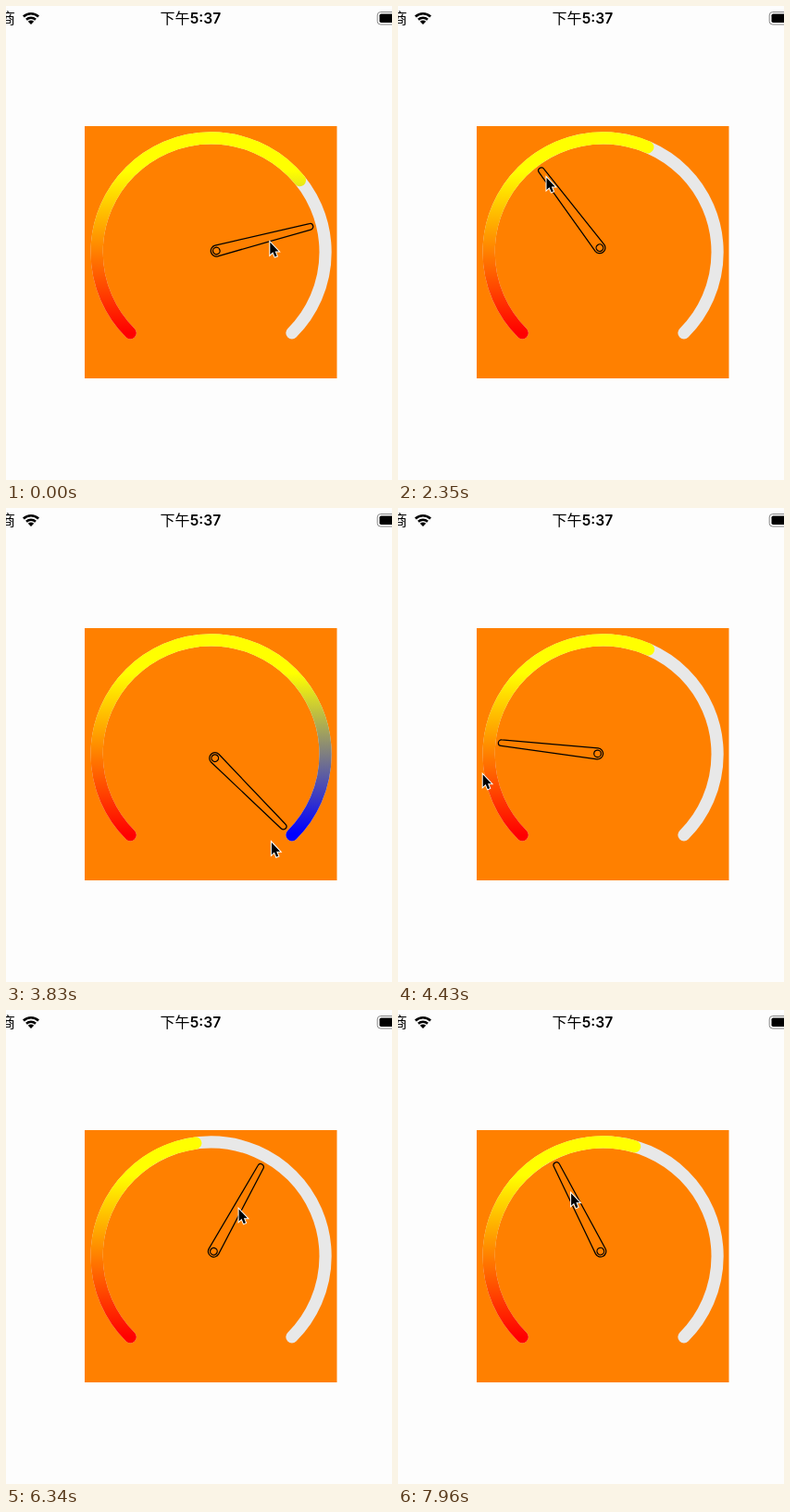
These frames come from a looping animation (417x513 px, 8 s). An HTML page:

```html
<!DOCTYPE html>
<html lang="zh-CN">
<head>
<meta charset="utf-8">
<title>Gauge</title>
<style>
  html, body { margin: 0; width: 100%; height: 100%; overflow: hidden; background: #fdfdfd; }
  svg { display: block; width: 100%; height: 100%; }
  text { font: 500 16px "Noto Sans CJK SC", "Noto Sans CJK", sans-serif; fill: #000; }
  .clock { font: 600 15.6px Inter, sans-serif; }
  .arc { fill: none; stroke-width: 13.2; stroke-linecap: round; }
</style>
</head>
<body>
<svg viewBox="0 0 417 513">
  <defs>
    <linearGradient id="warm" gradientUnits="userSpaceOnUse" x1="0" y1="354" x2="0" y2="179">
      <stop stop-color="#f00"/><stop offset="1" stop-color="#ff0"/>
    </linearGradient>
    <linearGradient id="cool" gradientUnits="userSpaceOnUse" x1="0" y1="179" x2="0" y2="352">
      <stop stop-color="#ff0"/><stop offset="1" stop-color="#00f"/>
    </linearGradient>
    <path id="ring" pathLength="270" d="M134.3 353.8A123.5 123.5 0 1 1 308.9 353.8"/>
    <mask id="filled" maskUnits="userSpaceOnUse" x="85" y="130" width="273" height="273">
      <use id="progress" href="#ring" class="arc" stroke="#fff"/>
    </mask>
  </defs>

  <!-- Status bar -->
  <text x="10" y="19" text-anchor="end">商</text>
  <text x="166.5" y="19">下午</text>
  <text x="198.8" y="19" class="clock">5:37</text>
  <g fill="none" stroke="#000" stroke-width="2.6">
    <path d="M18.9 11.5A11.6 11.6 0 0 1 35.1 11.5"/>
    <path d="M22 14.7A7.2 7.2 0 0 1 32 14.7"/>
  </g>
  <path d="M27 20L23.8 16.8A4.6 4.6 0 0 1 30.2 16.8Z"/>
  <rect x="401.2" y="6.5" width="28" height="13.5" rx="3.5" fill="none" stroke="#888"/>
  <rect x="403.5" y="8.5" width="24" height="9.5" rx="1.8"/>

  <!-- Gauge -->
  <rect x="85" y="130" width="272.5" height="273" fill="#ff8000"/>
  <use href="#ring" class="arc" stroke="#e8e8e8"/>
  <g mask="url(#filled)">
    <rect x="85" y="130" width="137" height="273" fill="url(#warm)"/>
    <rect x="221.5" y="130" width="137" height="273" fill="url(#cool)"/>
  </g>
  <g id="needle" fill="none" stroke="#000" stroke-width="1.25">
    <path d="M6 -6L110.5 -3.3A3.3 3.3 0 0 1 110.5 3.3L6 6A6 6 0 0 1 6 -6Z"/>
    <circle cx="6" r="3.8"/>
  </g>
  <path id="cursor" d="M1 1.5V14.8L4 12L6.2 17.2L8.4 16.3L6.3 11.3H10.2Z"
        stroke="#fff" stroke-width="2" paint-order="stroke"/>
</svg>
<script>
const LOOP = 8000, TICK = 147.2, MAX_SWEEP = 270;
const NEEDLE_LAG = 0.25, ARC_LAG = 2;
const CENTER = { x: 221.5, y: 266.5 };

// The pointer drags around the dial and rests between drags.
// [first tick, last tick, degrees along the dial, distance from its centre]
const rest = [186, 60];
const drags = [
  [-2, 0, 214, 64],
  [3, 6, 253.5, 107],
  [9, 10, 224, 88],
  [10, 14, 158, 74],
  [14, 15.75, 98, 103],
  [18, 21, 305, 112],
  [25.6, 31, -25, 137],
  [36, 37, 43, 55],
  [37, 42.75, 164, 60],
  [44, 46, 258, 110],
  [49, 52, 151, 77],
  [52, 53.75, 108, 78]
];

const [progress, needle, cursor] = ["progress", "needle", "cursor"].map(id => document.getElementById(id));
const clamp = (value, low, high) => Math.min(Math.max(value, low), high);
const mix = (from, to, part) => from + (to - from) * part;

function pointerAt(tick) {
  let [sweep, radius] = rest;
  for (const [first, last, toSweep, toRadius] of drags) {
    const part = clamp((tick - first) / (last - first), 0, 1);
    sweep = mix(sweep, toSweep, part);
    radius = mix(radius, toRadius, part);
  }
  return { sweep, radius };
}

const dialAt = tick => clamp(pointerAt(tick).sweep, 0, MAX_SWEEP);

function draw(time) {
  // The picture advances in discrete ticks; needle and arc trail the pointer.
  const tick = Math.floor((time % LOOP + 6) / TICK);
  const { sweep, radius } = pointerAt(tick);
  const angle = (135 + sweep) * Math.PI / 180;
  const x = CENTER.x + radius * Math.cos(angle);
  const y = CENTER.y + radius * Math.sin(angle);
  cursor.setAttribute("transform", `translate(${x} ${y})`);

  const needleAngle = 135 + dialAt(tick - NEEDLE_LAG);
  needle.setAttribute("transform", `translate(${CENTER.x} ${CENTER.y}) rotate(${needleAngle})`);

  const filled = Math.max(dialAt(tick - ARC_LAG), 0.01);
  progress.setAttribute("stroke-dasharray", `${filled} 999`);
}

const start = performance.now();
function loop() {
  draw(performance.now() - start);
  requestAnimationFrame(loop);
}
loop();
</script>
</body>
</html>
```
